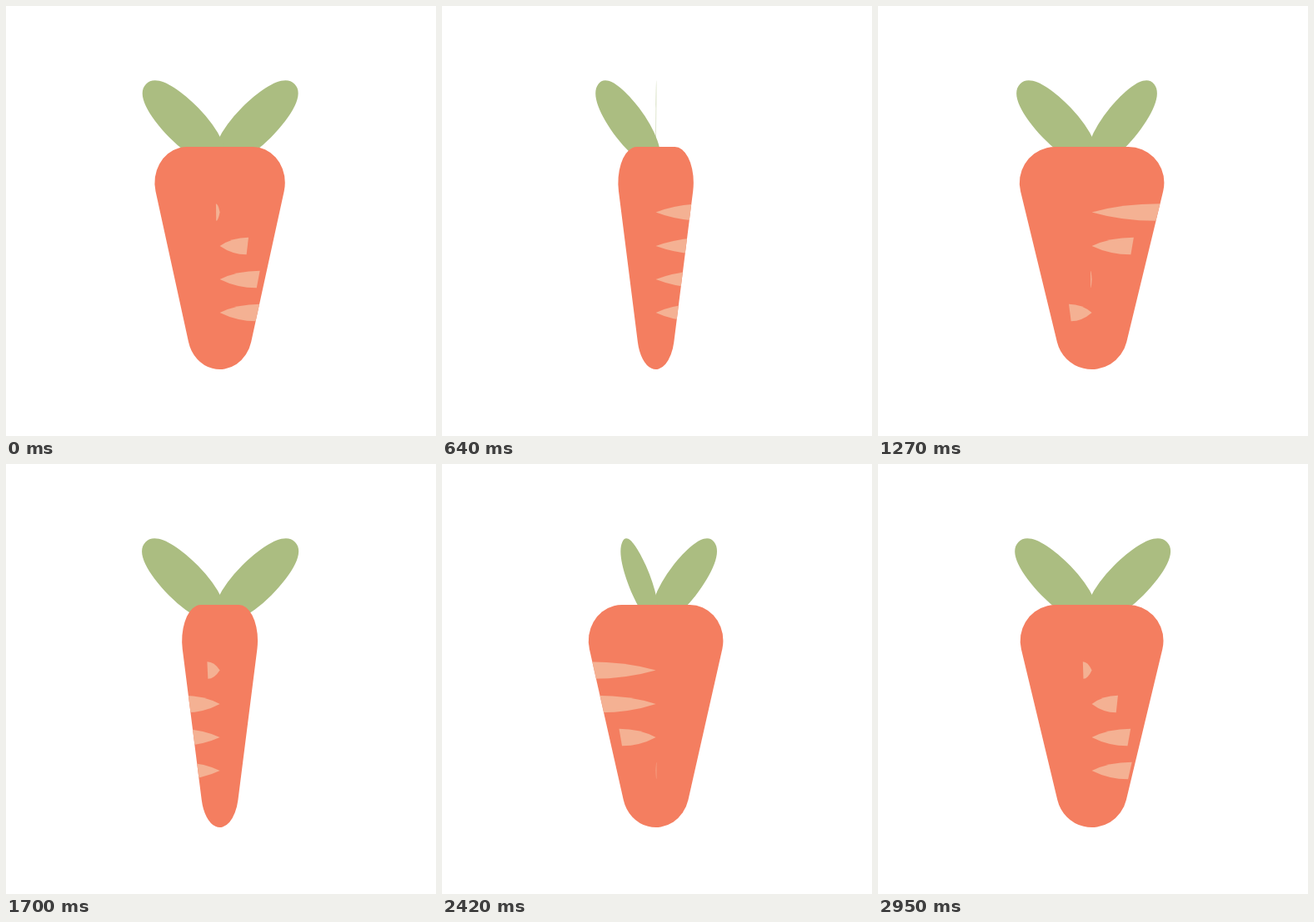
Recreate the animation shown at these times as an HTML page with a canvas. Size 516 by 516 pixels, loop 2.97 s.

```html
<!DOCTYPE html>
<html>
<head>
<meta charset="utf-8">
<style>
html, body { margin: 0; width: 100%; height: 100%; overflow: hidden; background: #fff; }
canvas { display: block; }
</style>
</head>
<body>
<canvas id="stage" width="516" height="516"></canvas>
<script>
const ctx = document.getElementById('stage').getContext('2d');
const LOOP = 2970, PAUSE = 280, CYCLE = LOOP - PAUSE, AXIS = 256.6;
const TURN = 1270;

// Cubic bezier (.3, 0, .2, 1), solved by bisection
function ease(x) {
  if (x <= 0) return 0;
  if (x >= 1) return 1;
  let lo = 0, hi = 1, s = 0.5;
  for (let i = 0; i < 24; i++) {
    s = (lo + hi) / 2;
    const bx = 0.9 * (1 - s) * (1 - s) * s + 0.6 * (1 - s) * s * s + s * s * s;
    if (bx < x) lo = s; else hi = s;
  }
  return s * s * (3 - 2 * s);
}

// Value of a cyclic track; keys are [start, duration, target]
function track(u, keys) {
  let v = keys[keys.length - 1][2];
  for (const k of [-1, 0, 1])
    for (const [start, dur, to] of keys)
      v += (to - v) * ease((u - start - k * CYCLE) / dur);
  return v;
}

const leaves = [
  [[-34, TURN, -1], [1372, TURN, 1]],
  [[170, TURN, 1], [1584, TURN, -1]]
];
const girth = [[153, 910, 1], [1318, 243, 0.32], [1580, 910, 1], [2658, 198, 0.32]];
const stripes = [368, 328, 288, 247.5].map((y, i) => {
  const start = 397 + 190 * i;
  return { y, keys: [[start, TURN, -1], [start + 1343, TURN, 1]] };
});

// Draws a shape squeezed horizontally around the carrot's axis
function squeezed(scale, trace) {
  ctx.save();
  ctx.translate(AXIS, 0);
  ctx.scale(scale, 1);
  ctx.beginPath();
  trace();
  ctx.restore();
}

// Half an ellipse towards the root, closed by a blunt rounded tip
function leaf() {
  ctx.translate(44, 140);
  ctx.rotate(-Math.PI / 4);
  ctx.ellipse(0, 0, 68, 25, 0, Math.PI / 2, 1.5 * Math.PI);
  ctx.bezierCurveTo(38, -24.5, 65.5, -17, 65.5, 0);
  ctx.bezierCurveTo(65.5, 17, 38, 24.5, 0, 25);
}

function body() {
  const r = 43, tilt = Math.atan2(44, 181);
  ctx.arc(44, 212, r, -Math.PI / 2, tilt);
  ctx.arc(0, 393, r, tilt, Math.PI - tilt);
  ctx.arc(-44, 212, r, Math.PI - tilt, 1.5 * Math.PI);
  ctx.closePath();
}

function stripe(y) {
  const edge = h => 85.8 - (h - 222.2) * 0.243;
  const top = y - 10.3, bottom = y + 10.3;
  ctx.moveTo(0, y);
  ctx.quadraticCurveTo(edge(y) * 0.45, top, edge(top), top);
  ctx.lineTo(edge(bottom), bottom);
  ctx.quadraticCurveTo(edge(y) * 0.45, bottom, 0, y);
}

function draw(t) {
  // The motion rests briefly near the start of each loop
  const u = t < 20 ? t : Math.max(20, t - PAUSE);
  ctx.fillStyle = '#fff';
  ctx.fillRect(0, 0, 516, 516);

  ctx.fillStyle = '#abbd81';
  for (const keys of leaves) {
    squeezed(track(u, keys), leaf);
    ctx.fill();
  }

  ctx.save();
  squeezed(track(u, girth), body);
  ctx.fillStyle = '#f47e60';
  ctx.fill();
  ctx.clip();
  ctx.fillStyle = '#f4b193';
  for (const { y, keys } of stripes) {
    squeezed(track(u, keys), () => stripe(y));
    ctx.fill();
  }
  ctx.restore();
}

function frame() {
  draw(performance.now() % LOOP);
  requestAnimationFrame(frame);
}
frame();
</script>
</body>
</html>
```
